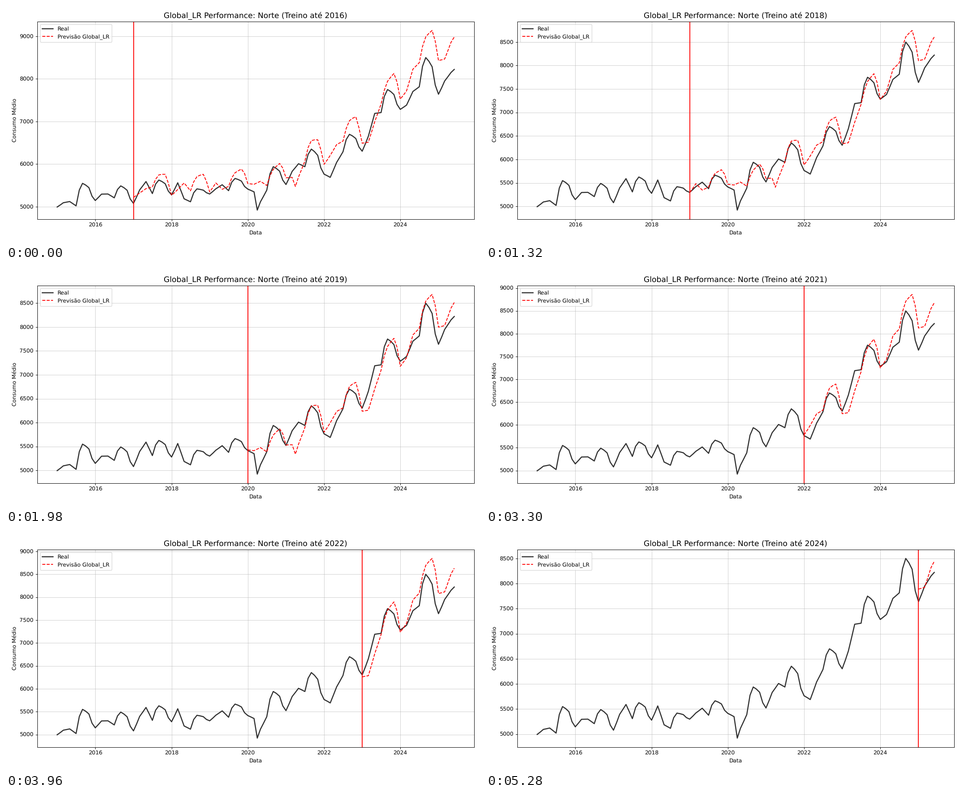
A matplotlib script that plays this animation: 1058x529 px, repeating every 5.94 s.

```python
import numpy as np
import matplotlib.pyplot as plt
from matplotlib.animation import FuncAnimation

W, H, DPI = 1058, 529, 88.17
START, FIRST_TRAIN = 2015, 2016
DATES = np.arange("2015-01", "2025-07", dtype="datetime64[M]").astype("datetime64[D]")
MONTHS = np.arange(len(DATES))

# Consumption of each year in January, March, May, July and September
YEARS = [
    (4995, 5095, 5123, 5022, 5550),
    (5147, 5297, 5300, 5210, 5490),
    (5080, 5395, 5592, 5310, 5627),
    (5280, 5563, 5187, 5117, 5420),
    (5300, 5422, 5517, 5378, 5665),
    (5415, 5350, 5115, 5390, 5940),
    (5522, 5830, 6010, 5940, 6353),
    (5765, 5690, 6040, 6290, 6700),
    (6303, 6655, 7190, 7210, 7750),
    (7285, 7385, 7705, 7815, 8500),
    (7640, 7950, 8150, 8294, 8600),
]
# Progress of the twelve months along those five points: quick rise, slow fall
PACE = np.array([0, 0.5, 1, 1.5, 2, 2.5, 3, 3.7, 4, 4.1, 4.25, 4.75])

# Half-yearly level of the forecast, from January 2017
LEVELS = [1617, 1740, 1714, 1585, 1654, 1815, 1835, 1660, 1890,
          2200, 2130, 2280, 2455, 2880, 3113, 3190, 3330, 3480]

# Models trained until 2016, 2017, ...: offset, drift per year, damping
MODELS = [
    (0, 0, 0), (-12, 0, 0.044), (-25, 0, 0.088),
    (-80, -25, 0.066), (-340, -98, 0), (-215, -30, 0),
    (-230, -60, 0), (-315, -140, 0), (-540, 0, 0),
]


def consumption():
    points = np.ravel(YEARS)
    place = 5 * (MONTHS // 12) + PACE[MONTHS % 12]
    curve = np.interp(place, np.arange(len(points)), points)
    curve[DATES == np.datetime64("2020-04-01")] -= 310  # sudden one-month slump
    return curve


REAL = consumption()


def forecast(model):
    first = 12 * (FIRST_TRAIN + 1 + model - START)
    t = MONTHS[first:]
    level = np.interp(t, 24 + 6 * np.arange(len(LEVELS)), LEVELS)
    season = np.interp(t % 12, [0, 2, 6, 10, 11], [0, -0.025, 0.045, 0.155, 0.12])
    value = 0.7 * REAL[t - 12] + level * (1 + season)
    offset, drift, damping = MODELS[model]
    value += offset + drift * ((t - first) // 12) - damping * (value - 5000)
    return DATES[t], value


plt.rcParams["text.hinting"] = "none"
fig, ax = plt.subplots(figsize=(12, 6), dpi=DPI)
fig.subplots_adjust(left=69.9 / W, right=1044.8 / W,
                    bottom=1 - 477.6 / H, top=1 - 34.7 / H)


def draw(model):
    year = FIRST_TRAIN + model
    ax.clear()
    ax.plot(DATES, REAL, color="black", alpha=0.8, lw=2, label="Real")
    ax.plot(*forecast(model), color="red", ls="--", lw=1.5, label="Previsão Global_LR")
    ax.axvline(np.datetime64(f"{year + 1}-01-01"), color="red", lw=1.5)
    ax.set_title(f"Global_LR Performance: Norte (Treino até {year})", fontsize=14)
    ax.set_xlabel("Data")
    ax.set_ylabel("Consumo Médio")
    ax.legend(loc="upper left")
    ax.grid(True, alpha=0.6)
    return ax.get_children()


anim = FuncAnimation(fig, draw, frames=len(MODELS), interval=660,
                     init_func=lambda: [], repeat=True, repeat_delay=0)
plt.show()
```
